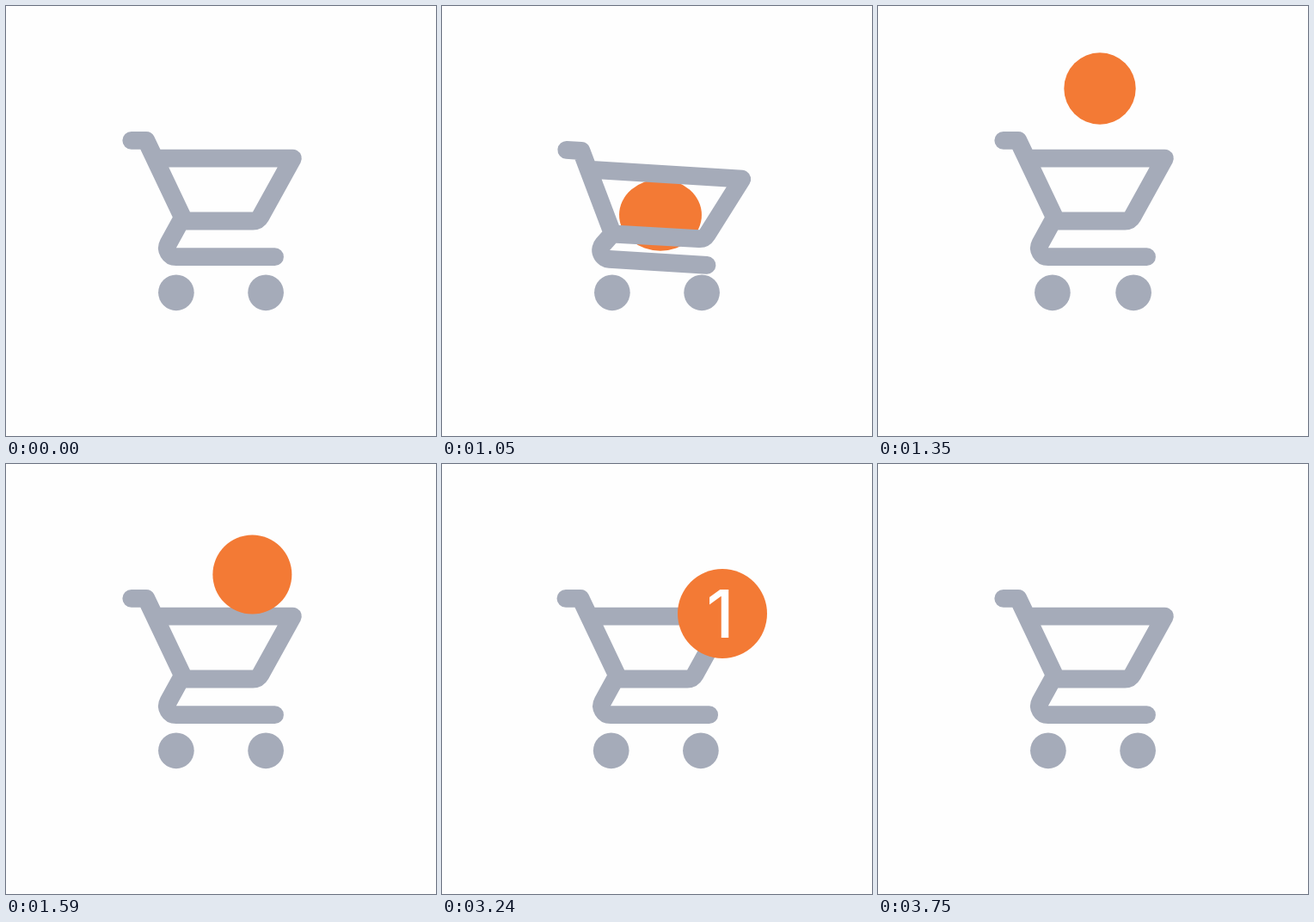
An HTML page with a canvas that plays this animation: 500x500 px, repeating every 4530 ms.

```html
<!DOCTYPE html>
<html lang="en">
<head>
<meta charset="utf-8">
<title>Shopping cart</title>
<style>
  html, body { margin: 0; width: 100%; height: 100%; overflow: hidden; background: #fefefe; }
  canvas { display: block; width: 100vw; height: 100vh; }
</style>
</head>
<body>
<canvas id="stage" width="500" height="500"></canvas>
<script>
const ctx = document.getElementById('stage').getContext('2d');
const LOOP = 4530, STEP = 30, STROKE = 20.83;
const GREY = '#a5abb9', ORANGE = '#f37a35';

const linear = p => p;
const inOut = p => p * p * (3 - 2 * p);
const out = p => 1 - (1 - p) ** 2;

// Keys are [time, value, easing towards this key].
function track(keys, t) {
  if (t <= keys[0][0]) return keys[0][1];
  for (let i = 1; i < keys.length; i++) {
    const [t0, v0] = keys[i - 1], [t1, v1, ease = inOut] = keys[i];
    if (t < t1) return v0 + (v1 - v0) * ease((t - t0) / (t1 - t0));
  }
  return keys[keys.length - 1][1];
}

const motion = {
  ballX: [[780, 247], [1050, 254, linear], [1350, 258, linear], [1890, 326]],
  ballY: [[780, -42], [1020, 246, linear], [1050, 243], [1350, 96, out], [1890, 174]],
  radius: [[1350, 41.7], [1890, 52], [3240, 52], [3480, 0]],
  load: [[930, 0], [1035, 1.05], [1050, 1], [1350, 0]],
  pinch: [[1200, 0], [1350, 5], [1560, 0]],
  label: [[1620, 0], [2010, 1]],
  bodyX: [[3210, 0], [3450, -43], [3750, 0]],
  wheelX: [[3210, 0], [3510, -43], [3750, 0]]
};

// Centre-line nodes: x, y empty, then x, y when the ball presses the basket.
const nodes = {
  grip: [145.8, 156.3, 144.8, 167.3],
  bend: [162.9, 156.3, 162, 168.5],
  foot: [207.4, 250, 198.5, 265],
  rimLeft: [172.8, 177.1, 170.2, 190.2],
  rimRight: [333.4, 177.1, 348.8, 201.2],
  baseRight: [293.1, 250, 305, 270.9],
  arm: [203.2, 250, 198, 265],
  heel: [180.3, 291.7, 173, 293],
  toe: [312.5, 291.7, 308, 301.3]
};

function disc(x, y, rx, ry, color) {
  ctx.fillStyle = color;
  ctx.beginPath();
  ctx.ellipse(x, y, rx, ry, 0, 0, 7);
  ctx.fill();
}

function drawCart(load, bodyX, wheelX, pinch) {
  const at = name => {
    const [x0, y0, x1, y1] = nodes[name];
    return [x0 + (x1 - x0) * load + bodyX, y0 + (y1 - y0) * load];
  };
  const move = name => ctx.moveTo(...at(name));
  const line = name => ctx.lineTo(...at(name));
  const curve = (corner, next) => {
    ctx.arcTo(...at(corner), ...at(next), STROKE / 2);
    line(next);
  };
  ctx.strokeStyle = GREY;
  ctx.lineWidth = STROKE;
  ctx.lineCap = ctx.lineJoin = 'round';
  ctx.beginPath();
  move('grip'); line('bend'); line('foot');
  curve('baseRight', 'rimRight');
  line('rimLeft');
  move('arm');
  curve('heel', 'toe');
  ctx.stroke();
  disc(197.9 + pinch + wheelX, 333.3, 20.83, 20.83, GREY);
  disc(302.1 - pinch + wheelX, 333.3, 20.83, 20.83, GREY);
}

function drawBall(x, y, r, load, label) {
  disc(x, y, r * (1 + 0.15 * load), r, ORANGE);
  if (!label || r <= 0) return;
  ctx.save();
  ctx.translate(x, y);
  ctx.scale(r / 52, r / 52);
  ctx.globalAlpha = label;
  ctx.fillStyle = '#fff';
  ctx.font = '500 77px Inter, sans-serif';
  ctx.fillText('1', 7.5 - ctx.measureText('1').actualBoundingBoxRight, 28);
  ctx.restore();
}

function draw(t) {
  const v = {};
  for (const name in motion) v[name] = track(motion[name], t);
  const ball = () => drawBall(v.ballX, v.ballY, v.radius, v.load, v.label);
  const cart = () => drawCart(v.load, v.bodyX, v.wheelX, v.pinch);
  ctx.clearRect(0, 0, 500, 500);
  // The ball drops in behind the bars and comes back in front of them.
  for (const layer of t < 1300 ? [ball, cart] : [cart, ball]) layer();
}

const start = performance.now();
function frame() {
  const t = (performance.now() - start) % LOOP;
  draw(Math.floor(t / STEP) * STEP);
  requestAnimationFrame(frame);
}
frame();
</script>
</body>
</html>
```
